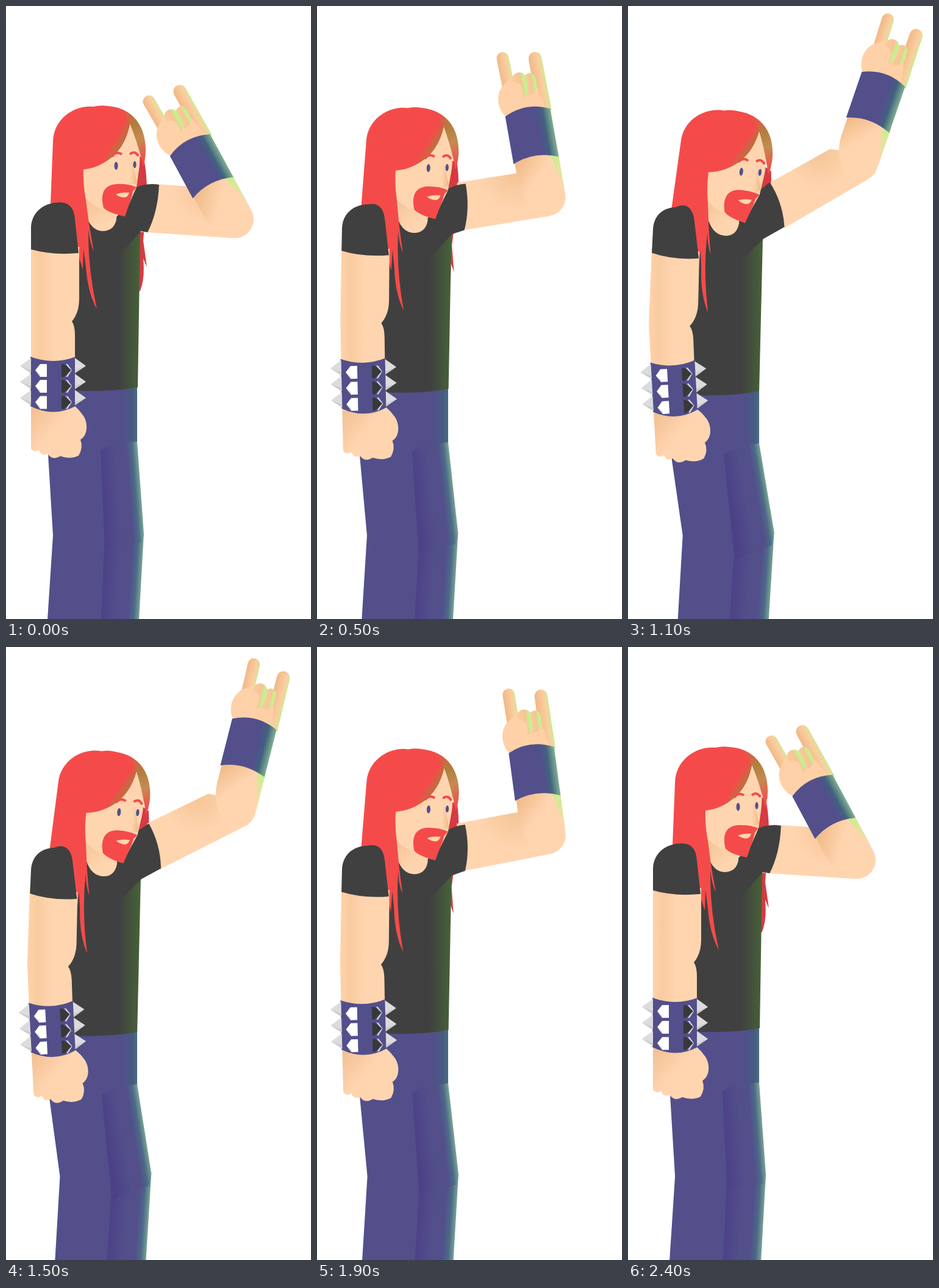
An HTML page that plays this animation: 500 by 1005 pixels, repeating every 2.5 s.

```html
<!DOCTYPE html>
<html lang="en">
<head>
<meta charset="utf-8">
<title>Horns up</title>
<style>
  html, body { margin: 0; width: 100%; height: 100%; overflow: hidden; background: #fff; }
  svg { display: block; width: 100vw; height: 100vh; }
</style>
</head>
<body>
<svg viewBox="0 0 500 1005">
  <defs>
    <linearGradient id="shirt" gradientUnits="userSpaceOnUse" x1="185" x2="219">
      <stop offset="0" stop-color="#404040"/><stop offset="1" stop-color="#466138"/>
    </linearGradient>
    <linearGradient id="hip" gradientUnits="userSpaceOnUse" x1="190" x2="216">
      <stop offset="0" stop-color="#524f8b"/><stop offset=".65" stop-color="#485a82"/><stop offset="1" stop-color="#477080"/>
    </linearGradient>
    <linearGradient id="leg">
      <stop offset="0" stop-color="#4c4087"/><stop offset=".42" stop-color="#524f8b"/><stop offset=".7" stop-color="#524f8b"/>
      <stop offset=".85" stop-color="#4c6a88"/><stop offset="1" stop-color="#7daa94"/>
    </linearGradient>
    <linearGradient id="thigh" href="#leg" gradientUnits="userSpaceOnUse" x1="151" x2="216"
      gradientTransform="rotate(-4.2 215 718)" data-to="rotate(-9.8 215 718)"/>
    <linearGradient id="calf" href="#leg" gradientUnits="userSpaceOnUse" x1="161" x2="227"
      gradientTransform="translate(0 0) rotate(3.3 226 865)" data-to="translate(14 -2) rotate(3.6 226 865)"/>
    <linearGradient id="bang" gradientUnits="userSpaceOnUse" x1="172" y1="215" x2="203" y2="234">
      <stop offset="0" stop-color="#f44b4a"/><stop offset="1" stop-color="#a18239"/>
    </linearGradient>
    <linearGradient id="lock" gradientUnits="userSpaceOnUse" x1="186" y1="172" x2="225" y2="254">
      <stop offset="0" stop-color="#f44b4a"/><stop offset=".32" stop-color="#b07e3d"/>
      <stop offset=".62" stop-color="#c48b50"/><stop offset="1" stop-color="#f44b4a"/>
    </linearGradient>
    <linearGradient id="nose" gradientUnits="userSpaceOnUse" x1="203" x2="215">
      <stop offset="0" stop-color="#ffd5b0"/><stop offset="1" stop-color="#eeb884"/>
    </linearGradient>
    <linearGradient id="neck" gradientUnits="userSpaceOnUse" x1="132" y1="312" x2="160" y2="358">
      <stop offset="0" stop-color="#f3c294"/><stop offset="1" stop-color="#ffd5b0"/>
    </linearGradient>
    <linearGradient id="arm">
      <stop offset="0" stop-color="#ffd2a9"/><stop offset=".2" stop-color="#f9cba0"/><stop offset=".5" stop-color="#ffd5b0"/>
    </linearGradient>
    <linearGradient id="fist" gradientUnits="userSpaceOnUse" x1="41" y1="672" x2="75" y2="702">
      <stop offset="0" stop-color="#f4c296"/><stop offset="1" stop-color="#ffd5b0"/>
    </linearGradient>
    <radialGradient id="bicep" gradientUnits="userSpaceOnUse" cx="-48" cy="-46" r="60">
      <stop offset="0" stop-color="#f5c596"/><stop offset="1" stop-color="#ffd5b0"/>
    </radialGradient>
    <linearGradient id="forearm" gradientUnits="userSpaceOnUse" x1="-42" y1="-58" x2="-12" y2="-30">
      <stop offset="0" stop-color="#f0bc8a"/><stop offset="1" stop-color="#ffd5b0"/>
    </linearGradient>
    <linearGradient id="rim" gradientUnits="userSpaceOnUse" x1="0" y1="-66" x2="0" y2="-12">
      <stop offset="0" stop-color="#c8f08c"/><stop offset="1" stop-color="#ffd5b0"/>
    </linearGradient>
    <linearGradient id="cuff">
      <stop offset="0" stop-color="#524f8b"/><stop offset=".68" stop-color="#524f8b"/>
      <stop offset=".82" stop-color="#42617f"/><stop offset="1" stop-color="#7fb08f"/>
    </linearGradient>
    <linearGradient id="finger">
      <stop offset="0" stop-color="#f1b884"/><stop offset=".68" stop-color="#fbcda1"/><stop offset="1" stop-color="#c9ee8f"/>
    </linearGradient>
    <linearGradient id="knuckle">
      <stop offset="0" stop-color="#fbcb9e"/><stop offset=".6" stop-color="#f5c596"/><stop offset=".8" stop-color="#c9ee8f"/>
    </linearGradient>
    <g id="studs">
      <path fill="#dcdcde" d="M23 590L41 577V602ZM131 590L113 577V602Z"/>
      <path fill="#cbccce" d="M23 590L41 597V602ZM131 590L113 597V602Z"/>
      <path fill="#fff" d="M48 597L56 587H67V608H56Z"/>
      <path fill="#d9d9dd" d="M48 597L56 604V608ZM98 587H101L108 597L101 608H98L106 597Z"/>
      <path fill="#383838" d="M91 587H95L107 597L95 608H91Z"/>
    </g>
  </defs>

  <!-- far hair -->
  <g transform="rotate(0 85 320)" data-to="rotate(8.5 85 320)">
    <path fill="#d63a42" d="M208 240L226 250Q231 275 231 305L225 385L231 428L225 414Q228 447 220 467L205 470Z"/>
  </g>

  <!-- trousers -->
  <path fill="#524f8b" d="M69 735L77 868L68 1006L160 1006L172 868L180 720L215 715L215 622L105 622L70 665Z"
    data-to="M72 745L90 868L82 1006L172 1006L186 868L182 726L215 718L215 628L105 628L71 672Z"/>
  <path fill="url(#hip)" d="M185 620L215 620L215 718L185 724Z" data-to="M185 627L215 627L215 720L185 727Z"/>
  <path fill="url(#calf)" d="M162 860L226 864L218 1006L156 1006L162 866Z" data-to="M175 860L240 862L231 1006L167 1006L176 866Z"/>
  <path fill="url(#thigh)" d="M155 728L174 718L215 714L226 866L222 880L162 888Z" data-to="M157 735L176 724L215 717L240 863L236 884L175 908Z"/>

  <!-- shirt -->
  <path fill="url(#shirt)" d="M95 345L130 340L181 345L222 350L220 376L216 625Q165 634 100 630Z"
    data-to="M95 350L130 345L181 350L222 355L221 382L215 632Q165 641 100 638Z"/>

  <!-- raised arm -->
  <g transform="translate(375 350)" data-to="translate(379 254.5)">
    <g transform="rotate(4)" data-to="rotate(-31)">
      <path fill="url(#bicep)" d="M-140 -49L-30 -49L0 -20L0 31L-160 31Z" data-to="M-142 -45L-30 -43L0 -20L0 31L-160 31Z"/>
    </g>
    <g transform="rotate(-28.5)" data-to="rotate(20)">
      <path fill="url(#forearm)" d="M-42 -72H31V0A31 31 0 0 1 -14 27.5Q-42 0 -42 -34Z"/>
      <path fill="url(#rim)" d="M18 -70H31V-6Q25 -30 18 -70Z"/>
      <path fill="url(#finger)" d="M10 -227A10.5 10.5 0 0 1 31.5 -228L33 -140H10Z"/>
      <path fill="#ffd0a6" d="M-20 -190L14 -188L25 -140H-10Z"/>
      <path fill="url(#knuckle)" d="M-3 -196A9 9 0 0 1 16 -196V-183Q14 -171 4 -170H-3Z"/>
      <path fill="url(#finger)" d="M-41.5 -237A10 10 0 0 1 -21.5 -237L-20 -180H-40Z"/>
      <path fill="url(#knuckle)" d="M-23 -196A11.5 11.5 0 0 1 1 -199V-184Q0 -170 -11 -167H-23Z"/>
      <path fill="#ffd1a8" d="M-40 -192L-22 -204V-195Q-9 -193 -8 -182Q-8 -172 -10 -167L4 -139H-40C-54 -152 -55 -178 -40 -192Z"/>
      <path fill="url(#cuff)" d="M-44 -142Q-7 -160 31 -142V-62Q-7 -78 -44 -63Z"/>
    </g>
  </g>
  <path fill="#404040" d="M178 352L205 305L214 297Q232 290 251 293Q249 338 232 371L221 369L190 404L170 400Z"
    data-to="M178 358L205 312L214 304Q224 296 232 289Q254 322 257 362L222 382L192 411L170 406Z"/>

  <!-- neck -->
  <path fill="url(#neck)" d="M124 300L182 315L181 350Q177 369 158 369Q140 368 132 345Z"
    data-to="M121 306L184 322L182 357Q178 377 160 377Q140 376 132 352Z"/>

  <!-- head -->
  <g transform="rotate(0 85 320)" data-to="rotate(5.8 85 320)">
    <path fill="#ffd5b0" d="M203 193C217 212 223 240 217 275L214 297L195 340L160 334Q145 328 131 316L116 300L118 262Z"/>
    <path fill="url(#nose)" d="M205 248L215 289Q213 293 205 292L200 292Z"/>
    <path fill="#f44b4a" d="M72 350L77 222C78 185 112 162 143 165Q155 162 167 164C188 167 201 180 203 193C196 230 168 264 127 268Q126 292 131 318L136 356Q139 375 144 402Q137 388 135 366Q134 430 149 497Q134 470 131 428L127 398L126 432Q114 400 113.500 362L110 352Z"/>
    <path fill="url(#bang)" d="M199 184L203 193C198 222 184 244 160 257Q178 225 199 184Z"/>
    <path fill="url(#lock)" d="M167 164C208 167 229 197 229 236Q229 250 225 263Q216 224 203 193C200 181 187 169 167 164Z"/>
    <g fill="#524f8b">
      <ellipse cx="180.500" cy="262" rx="3" ry="6.500"/><ellipse cx="211" cy="260" rx="2.600" ry="5.800"/>
    </g>
    <path fill="none" stroke="#f44b4a" stroke-width="4" d="M174 247Q180 237 190 243M203 243Q211 236 217 246"/>
    <path fill="#f44b4a" d="M158 312Q160 294 180 292Q200 291 214 297L208 304L206 313L195 345Q170 340 160 331Q157 320 158 312Z"/>
    <path fill="#ffd9a8" d="M180 309Q190 305 202 306Q200 314 193 314Q185 313 180 309Z"/>
  </g>

  <!-- lowered arm -->
  <path fill="url(#arm)" d="M41 390L41 515L41 590L113 590L113 540Q113 524 108 517Q120 503 120 480L120 395Z"
    data-to="M39 396L34 522L38 598L109 598L107 546Q106 531 101 525Q114 511 115 488L117 403Z"/>
  <path fill="#404040" d="M41 399L41 362C43 335 65 322 88 322C106 322 112 334 113 350L119 405Q76 409 41 399Z"
    data-to="M39 405L41 366C43 340 60 331 78 330C98 320 108 336 109 355L116 414Q74 417 39 405Z"/>
  <g transform="translate(0 0) rotate(0 77 640)" data-to="translate(0 7.5) rotate(-3.3 77 640)">
    <path fill="url(#fist)" d="M41 650V726Q47 733 54 728Q58 739 68 734Q76 746 89 738Q106 744 119 737Q127 724 122 711C134 704 135 685 127 672Q121 663 112 655Z"/>
    <path fill="#524f8b" d="M40 575Q78 589 114 575V656Q78 675 40 656Z"/>
    <use href="#studs"/><use href="#studs" y="26"/><use href="#studs" y="52.500"/>
  </g>
</svg>
<script>
  const LOOP = 2500, STEP = 100, LEAD = 30;
  const NUMBER = /-?\d*\.?\d+/g;
  const ATTRIBUTE = { path: 'd', g: 'transform', linearGradient: 'gradientTransform' };

  const parts = [...document.querySelectorAll('[data-to]')].map(el => {
    const attr = ATTRIBUTE[el.tagName];
    const from = el.getAttribute(attr);
    const ends = el.dataset.to.match(NUMBER).map(Number);
    return { el, attr, from, ends };
  });

  // Blend every moving part between its lowest (0) and highest (1) pose.
  function pose(p) {
    for (const { el, attr, from, ends } of parts) {
      let i = 0;
      el.setAttribute(attr, from.replace(NUMBER, n => (+n + (ends[i++] - n) * p).toFixed(2)));
    }
  }

  function frame() {
    const t = Math.floor(performance.now() % LOOP / STEP) * STEP;
    pose((1 - Math.cos(2 * Math.PI * (t + LEAD) / LOOP)) / 2);
    requestAnimationFrame(frame);
  }
  frame();
</script>
</body>
</html>
```
